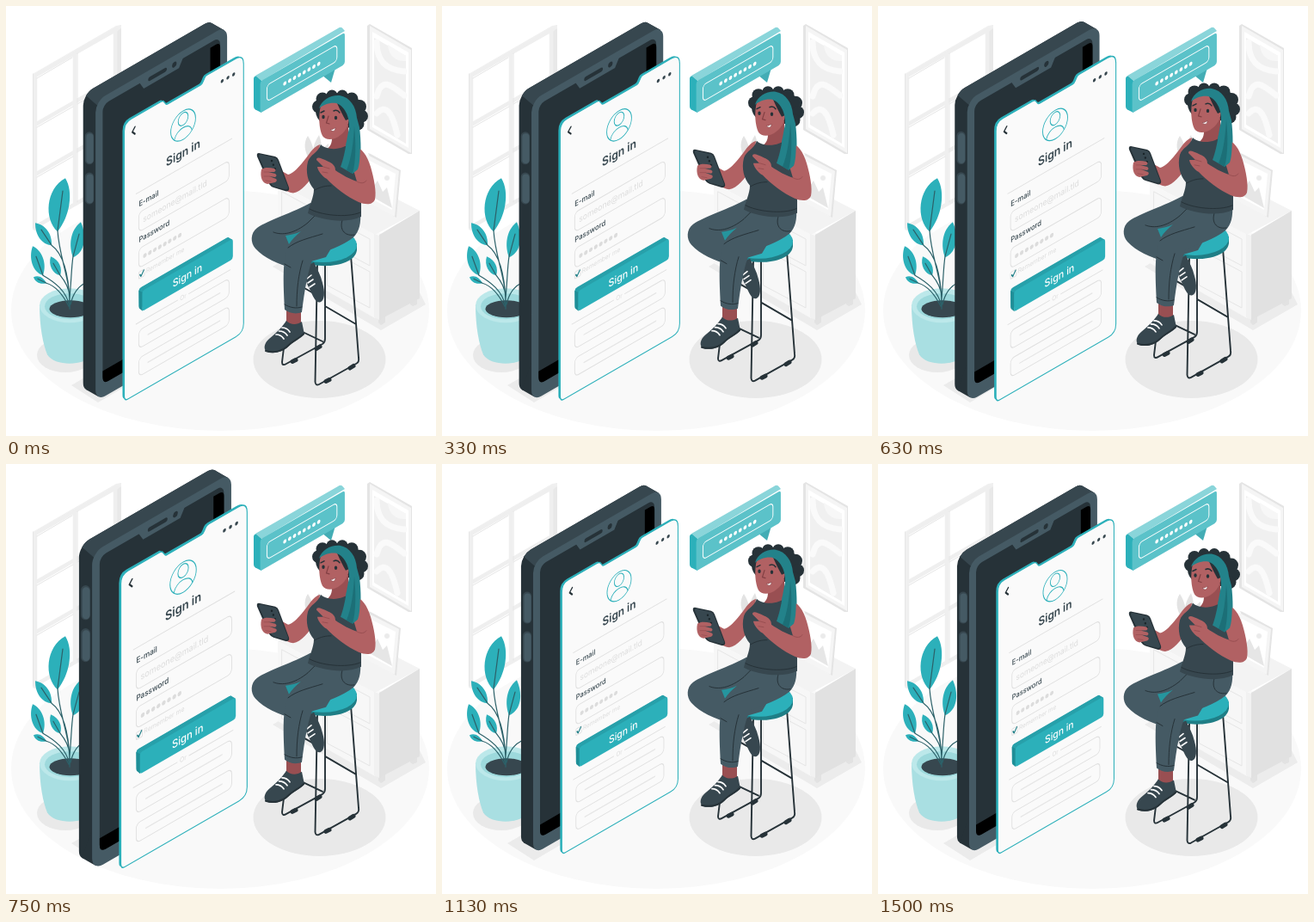
Animation, 500 px wide and 500 px high, one loop 1.54 s. Source, as an HTML page:

```html
<!DOCTYPE html>
<html lang="en">
<head>
<meta charset="utf-8">
<title>Sign in</title>
<style>
  @property --p { syntax: "<number>"; inherits: true; initial-value: 1; }
  html, body { margin: 0; width: 100%; height: 100%; overflow: hidden; background: #fff; }
  /* one loop is 37 ticks; every pose is derived from the tick */
  svg { display: block; width: 100%; height: 100%; animation: tick 1.54s steps(37) -4ms infinite; }
  @keyframes tick { from { --p: 1; } to { --p: 38; } }
  .beat {
    transform: scale(calc(1 + .1 * max(0,
      min(var(--p) / 3.7, (11.1 - var(--p)) / 7.4),
      min((var(--p) - 14.8) / 3.7, (22.2 - var(--p)) / 3.7))));
  }
  .float { transform: translateY(calc((min(var(--p), 37 - var(--p)) - 1) * -10px / 18.5)); }

  .line { fill: none; stroke-linecap: round; stroke-linejoin: round; }
  .teal { fill: #2cb0ba; }
  .ink { fill: #263238; }
  .dark { fill: #37474f; }
  .slate { fill: #455a64; }
  .skin { fill: #b16163; }
  .shade { fill: #994f52; }
  .field { fill: none; stroke: #e0e0e0; }
  text { font-family: Inter, "Liberation Sans", sans-serif; fill: #37474f; }
  .label { font-size: 8.6px; font-weight: 500; }
  .hint { fill: #dcdcdc; }
  .mid { text-anchor: middle; }
</style>
</head>
<body>
<svg viewBox="0 0 500 500">
  <ellipse cx="249" cy="354" rx="243" ry="140" fill="#f9f9f9"/>

  <g id="window">
    <path fill="#e8e8e8" d="M128 25L134 22V200L128 204z"/>
    <path fill="#f0f0f0" d="M31 79L128 23L134 22V26L36 82V262L31 260z"/>
    <path fill="#fff" d="M36 81L128 28V204L36 257z"/>
    <path class="line" stroke="#efefef" stroke-width="4.500" d="M34 81V257M80 56V230M127 28V202M34 81L129 27M34 138L128 84M34 196L128 142M34 257L128 203"/>
    <path class="line" stroke="#e6e6e6" d="M31.500 79V258M83 55V228M36 141L78 117M36 199L78 175M83 114L126 89M36 84L77 60"/>
  </g>

  <g id="picture">
    <path fill="#e4e4e4" d="M420 23L423 21L472 49V172L468 172L420 144z"/>
    <path fill="#f5f5f5" d="M423 23L471 51V171L423 143z"/>
    <path fill="#fff" d="M426 30L468 54V165L426 141z"/>
    <path fill="#f0f0f0" d="M428 37L465 58V160L428 138z"/>
    <path class="line" stroke="#fafafa" stroke-width="7" d="M431 42C431 62 440 74 463 76M431 105C437 82 448 92 463 104M431 125C441 114 449 122 455 150"/>
    <path fill="#f7f7f7" d="M444 45C445 59 455 65 465 64V58z"/>
  </g>

  <g id="cabinet">
    <path fill="#ececec" d="M310 303L322 296L434 360L481 333L488 347L436 377z"/>
    <path fill="#e2e2e2" d="M433 357H441V368L436 371L433 368zM470 338H478V347L473 349L470 347z"/>
    <path fill="#f3f3f3" d="M316 206L364 178L481 238L429 266z"/>
    <path fill="#f7f7f7" d="M316 206L429 266V363L316 299z"/>
    <path fill="#e1e1e1" d="M434 266L481 238V340L434 365z"/>
    <path fill="#f1f1f1" d="M428 265L434 267V365L428 362z"/>
    <path class="line" stroke="#e6e6e6" d="M321 216L369 242V273L321 247zM374 245L423 271V302L374 276zM321 254L369 280V322L321 296zM374 283L423 309V351L374 325z"/>
    <path fill="#e3e3e3" d="M354 180C346 169 346 158 351 151C357 160 359 171 358 180zM358 180C355 169 358 159 364 150C369 162 366 172 362 181zM363 181C365 171 369 164 375 160C376 171 371 178 366 182z"/>
    <path fill="#e4e4e4" d="M421 171L424 172L459 191L454 246L450 244z"/>
    <path fill="#f5f5f5" d="M420 173L457 192L452 245L415 225z"/>
    <path fill="#fff" d="M423 180L453 195L449 237L419 221z"/>
    <path fill="#e6e6e6" d="M421 219L432 203L438 216L443 211L449 235z"/>
    <circle cx="443" cy="200" r="3" fill="#ebebeb"/>
  </g>

  <ellipse cx="364.500" cy="411" rx="77" ry="45" fill="#e9e9e9"/>
  <ellipse cx="69" cy="406" rx="33" ry="20" fill="#e9e9e9"/>
  <path fill="#ebebeb" d="M76 441L240 346L270 365L107 461z"/>

  <g id="plant" transform="translate(0 -.8)">
    <path fill="#a9dfe2" d="M39 348C39 374 43 394 48 406C56 420 92 420 100 406C105 394 109 374 109 348z"/>
    <ellipse cx="74" cy="349" rx="35" ry="20" fill="#bce8ea"/>
    <ellipse cx="74" cy="350" rx="29" ry="15" fill="#9dd9dc"/>
    <ellipse cx="75" cy="353" rx="24.500" ry="10" class="dark"/>
    <path class="teal" d="M69 201C79 217 74 246 60 263C44 249 46 213 69 201zM34 253C46 255 54 266 53 279C42 278 34 268 34 253zM87 252C74 262 73 280 78 293C91 288 95 270 87 252zM31 280C42 285 48 300 43 314C31 310 26 294 31 280zM52 292C62 296 66 306 63 314C54 312 49 302 52 292zM32 316C38 313 44 317 47 323C40 325 34 322 32 316z"/>
    <path class="line" stroke="#2c6169" stroke-width="1.200" d="M74 353C76 320 62 295 60 262L66 216M74 345C73 315 68 290 53 279L41 261M74 340C76 320 76 305 78 292L85 266M74 350C70 332 57 322 43 314L35 292M74 338C73 328 68 320 63 314L55 300M73 350C66 336 57 326 47 323L37 318M75 348C78 334 84 327 92 323"/>
  </g>

  <g id="phone" transform="translate(173.500 235.600)"><g class="beat">
    <g transform="matrix(.866 -.5 0 1 0 0)">
      <rect class="ink" x="-94.200" y="-176.800" width="172" height="340.200" rx="13"/>
      <path class="ink" d="M90.200-156.900L74-173L-90.400 159.600L-74.200 175.700z"/>
      <path class="dark" d="M-90.400-173A13 13 0 0 1-81.200-176.800H64.800A13 13 0 0 1 74-173L90.200-156.900L-72-150z"/>
      <rect class="slate" x="-78" y="-160.700" width="172" height="340.200" rx="13"/>
      <rect class="ink" x="-68.700" y="-152" width="153.600" height="316.500" rx="8"/>
      <path d="M72-146H79Q85-146 85-140V-90H72zM-68.700 149.500H-20V164.500H-61Q-68.700 164.500-68.700 156.500z"/>
      <path class="slate" d="M-21-153.500L-15-143.500H31L37-153.500z"/>
      <path class="line" stroke="#263238" stroke-width="4.500" d="M-7-150.500H13"/>
      <circle class="ink" cx="25" cy="-150.500" r="3"/>
    </g>
    <path class="line" stroke="#37474f" stroke-width="10" d="M-74.500-82V-55M-74.500-36V-10"/>
    <path class="line" stroke="#455a64" stroke-width="8" d="M-74-81V-55M-74-35V-10"/>
  </g></g>

  <g id="form" transform="translate(206 258.700)"><g class="beat"><g transform="matrix(.866 -.5 0 1 0 0)">
    <path id="card" class="teal" transform="translate(-2.300 -2.200)" d="M-68-158H-29Q-26-158-25-156L-23-153Q-22-151-20-151H23Q25-151 26-153L28-156Q29-158 32-158H68Q79-158 79-147V147Q79 157 69 157H-72Q-77 157-77 151V-148Q-77-158-68-158z"/>
    <path fill="#fafafa" stroke="#2cb0ba" stroke-width="1.200" d="M-68-158H-29Q-26-158-25-156L-23-153Q-22-151-20-151H23Q25-151 26-153L28-156Q29-158 32-158H68Q79-158 79-147V147Q79 157 69 157H-72Q-77 157-77 151V-148Q-77-158-68-158z"/>
    <path class="line" stroke="#263238" stroke-width="1.800" d="M-63-146.500L-66.500-142.500L-63-138.500"/>
    <path class="line" stroke="#37474f" stroke-width="3.800" stroke-dasharray="0 7.500" d="M51-141.500H67"/>
    <g class="line" stroke="#2cb0ba">
      <circle cy="-117" r="16.200"/>
      <ellipse cy="-124" rx="6.500" ry="7"/>
      <path d="M-11.500-106C-9-117 9-117 11.500-106"/>
    </g>
    <text class="mid" y="-81" font-size="13.700" font-weight="600">Sign in</text>
    <path class="field" d="M-62-70H64"/>
    <text class="label" x="-58" y="-53.500">E-mail</text>
    <rect class="field" x="-58" y="-47" width="118" height="22" rx="5"/>
    <text class="hint" x="-52.500" y="-33" font-size="9.600">someone@mail.tld</text>
    <text class="label" x="-58" y="-13">Password</text>
    <rect class="field" x="-58" y="-6" width="118" height="22" rx="5"/>
    <path class="line" stroke="#dcdcdc" stroke-width="4.800" stroke-dasharray="0 6.500" d="M-50 5.500H-4"/>
    <rect class="field" x="-58" y="20.500" width="7.500" height="7.500" rx="1"/>
    <path class="line" stroke="#1f7e86" stroke-width="1.500" d="M-56.500 24L-55 26.500L-51.500 21.500"/>
    <text class="hint" x="-48.500" y="26.500" font-size="7.300">Remember me</text>
    <g transform="translate(0 -1)">
      <rect x="-58" y="40" width="118" height="23" rx="3" fill="#27a0aa"/>
      <path fill="#27a0aa" d="M59 40.500L64.500 46L-52 46L-57 40.500z"/>
      <path fill="#1f8e97" d="M-58 42L-53 47V68L-57.500 62.500z"/>
      <rect class="teal" x="-53.500" y="45" width="118.500" height="23" rx="3"/>
      <text class="mid" x="5.500" y="61" font-size="12" font-weight="500" style="fill:#fff">Sign in</text>
    </g>
    <path class="field" d="M-62 77.500H-7M7 77.500H62"/>
    <text class="hint mid" y="80" font-size="7.300">Or</text>
    <rect class="field" x="-58" y="86.500" width="118" height="20.500" rx="5"/>
    <rect class="field" x="-58" y="118" width="118" height="20.500" rx="5"/>
    <path class="line" stroke="#e6e6e6" stroke-width="1.400" d="M-46 97H48M-46 128.500H48"/>
  </g></g></g>

  <g id="bubble">
    <path fill="#43adb5" d="M367 80L378 89L383 72z"/>
    <path fill="#2cb0ba" d="M291 81L297 86V124L290 120.500Q288 119 288 117V84Q288 82 291 81z"/>
    <path fill="#8ad5da" d="M290 81L386 26Q389 24 391 25.500L394 29L297 87z"/>
    <g transform="matrix(.866 -.5 0 1 345 77.500)">
      <rect x="-57" y="-18.500" width="113.500" height="37" rx="3" fill="#5bc2c9"/>
      <rect x="-48" y="-9.500" width="94" height="19" rx="4.500" fill="none" stroke="#fff" stroke-width="1.100"/>
      <path class="line" stroke="#fff" stroke-width="4.400" stroke-dasharray="0 6.500" d="M-24 .5H22"/>
    </g>
  </g>

  <g id="woman" class="float">
    <g class="line" stroke="#263238" stroke-width="1.900">
      <path d="M336 290L321 414Q321 419 326 416L368 393Q371 391 371 387V298M371 349L407 370M326 370L368 390M362 300L359.500 437Q360 442 364 440L407 416Q411 414 410 409L401 290M333 320L361 336"/>
      <path stroke-width="5" d="M333 413.500L337 411.500M361 398.500L365 396M372 436.500L376 434.500M400 421L404 418.500"/>
    </g>
    <path fill="#1f7e86" d="M329 278V285C334 306 404 310 408 284V276z"/>
    <ellipse class="teal" cx="368.500" cy="278" rx="39.500" ry="20"/>

    <path class="dark" d="M350 302C346 312 348 320 353 329C357 338 360 345 365 344.500C371 343 371 332 368 322C366 313 362 306 358 298z"/>
    <path class="line" stroke="#fff" stroke-width="1.600" d="M350 317L355 313M351 322L357 318M353 327L359 323"/>

    <path class="slate" d="M354 229C334 240 305 249 292 258C284 264 284 275 290 282C300 293 318 301 331 304L372 292L398 248z"/>
    <path class="shade" d="M326 352H343V371H326z"/>
    <path class="slate" d="M412 240C413 252 411 262 404 269C392 279 372 285 358 291C351 306 347 332 344 356C337 359 329 357 324 353C323 330 321 302 326 286C332 276 352 264 354 236z"/>
    <path fill="#25959e" d="M325 267C331 266 337 265 343 262C337 267 332 272 329 277z"/>
    <path class="line" stroke="#263238" d="M311 263C321 267 335 265 351 252L360 243M328 281C338 273 352 270 368 265M391 249C387 262 396 268 405 266M331 304L324 300M324 347C330 351 338 352 344 350M345 296C340 312 338 330 338 349"/>

    <path class="dark" d="M326 366C322 372 315 380 306 387C300 392 299 399 303 402C312 405 322 402 328 396C334 390 342 387 347 382L344 367C338 371 331 371 326 366z"/>
    <path class="line" stroke="#263238" stroke-width="2" d="M302 401C312 404 322 401 328 395C334 389 342 386 346 381"/>
    <path class="line" stroke="#fff" stroke-width="1.700" d="M314 382C318 382 321 384 323 387M317.500 378C321 378 325 380 327 383M321 374C325 374 328 376 330 379"/>

    <path class="skin" d="M365 161C356 164 352 174 344 183C338 190 333 195 328 196L317 190L312 206C320 210 326 217 334 217.500C344 216 351 205 361 193z"/>

    <g id="hair" class="ink">
      <ellipse cx="388" cy="122" rx="28" ry="21"/>
      <circle cx="363.500" cy="117" r="7.500"/><circle cx="368" cy="108" r="7.500"/><circle cx="379" cy="104" r="6.500"/>
      <circle cx="391" cy="104" r="6.500"/><circle cx="402" cy="108" r="7.500"/><circle cx="411" cy="117" r="8"/>
      <circle cx="413.500" cy="128" r="7.500"/><circle cx="409" cy="137" r="7.500"/>
    </g>
    <path class="shade" d="M378 147L398 138C398 150 399 158 405 164C398 174 383 175 374 166C379 161 380 156 378 147z"/>
    <path class="skin" d="M366 116C363 128 364 143 368 151C372 157 382 156 389 150C396 145 400 136 399 124C395 110 376 106 366 116z"/>
    <path class="ink" d="M385 113C389 122 392 128 395 133L402 130L398 113z"/>
    <path fill="#23828a" d="M364 119C367 109 378 103 388 104C400 106 407 117 408 130L411 141C413 157 413 176 411 184C409 190 406 194 403 195L389 187C394 173 396 155 399 142C400 128 393 116 384 113C376 112 369 115 364 119z"/>
    <path class="line" stroke="#263238" stroke-width="1.500" d="M366 124L370 122M381 122Q385 120 388 124"/>
    <ellipse class="ink" cx="369" cy="129" rx="1.700" ry="2.200"/><ellipse class="ink" cx="383.500" cy="130" rx="1.700" ry="2.200"/>
    <path class="line" stroke="#823f43" stroke-width="1.200" d="M375 128L372.500 136L376 137"/>
    <path fill="#fff" stroke="#823f43" stroke-width=".6" d="M377 143.500C379 144 381 143 383 141.500C383 145.500 380 147 377 143.500z"/>

    <path class="dark" d="M366 161C371 166 382 168 392 164C399 160 406 166 409 172L413 212V245C397 253 368 250 351 241C353 231 358 222 358 213C351 205 348 193 351 181C354 172 362 172 366 161z"/>
    <path class="line" stroke="#263238" d="M359 214C366 210 372 209 378 209M353 236C365 243 396 247 412 240"/>
    <path class="skin" d="M404 164C414 164 420 174 424 187C428 201 431 216 429 225C426 232 418 231 410 228C397 222 382 211 373 201C367 198 362 190 362 187L369 187L361 179C361 175 365 176 375 181C380 183 383 186 383 191C390 196 401 202 408 204C405 193 399 180 404 164z"/>
    <path class="line" stroke="#994f52" d="M408 204C413 207 417 206 419 203M369 187L376 189M368 193L374 194"/>
    <path fill="#23828a" d="M396 158H411.700C412 174 411 185 409 190L403 195L389 187C392 179 394 170 396 158z"/>
    <path fill="#1c6f77" d="M405 140C407 160 407 180 403 195L396 191C402 176 404 158 405 140z"/>

    <g id="handset">
      <path class="ink" d="M294 171L313 175Q316 176 317 179L329 211Q330 215 326 215.500L311 211Q308 210 306 207L292 175Q291 171 294 171z"/>
      <path class="dark" d="M296 172.500L313 176.500Q315 177 316 180L328 211Q328 214 325 213.500L312 210Q309 209 308 206L294 175Q293.500 172 296 172.500z"/>
      <path class="line" stroke="#1b2529" stroke-width="2.400" stroke-dasharray="0 5" d="M309 180L313 190"/>
      <path class="skin" d="M297 190C301 187 307 188 312 189Q315 191 312 193L305 193L313 195Q316 197 313 199L306 198L314 201Q316 203 313 205L304 207C298 206 295 199 297 190z"/>
      <path class="line" stroke="#994f52" stroke-width=".8" d="M300 193H306M300 198H307M302 203L308 204"/>
    </g>
  </g>
</svg>
</body>
</html>
```
